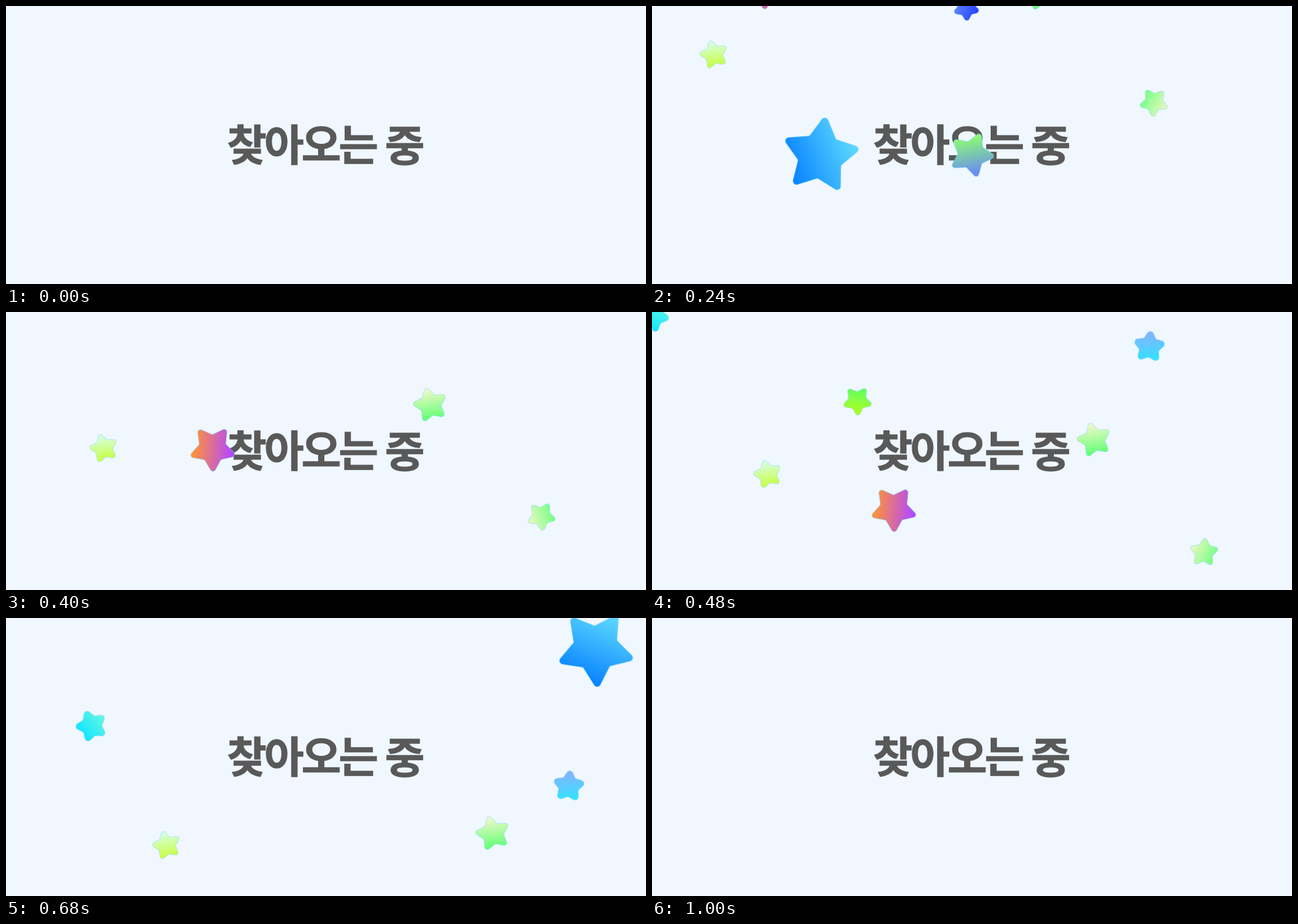
These frames come from a looping animation (1134x494 px, 1120 ms). An HTML page with a canvas:

```html
<!DOCTYPE html>
<html lang="ko">
<head>
<meta charset="utf-8">
<style>
html, body { margin: 0; width: 100%; height: 100%; overflow: hidden; background: #f0f7ff; }
canvas { display: block; }
</style>
</head>
<body>
<canvas id="stage" width="1134" height="494"></canvas>
<script>
const ctx = document.getElementById('stage').getContext('2d');
const STEP = 40, STEPS = 28, RAD = Math.PI / 180;
const stars = [];

// A star passes `pos` at its slowest moment, step `slow`, with velocity `vel`;
// surge and swerve speed it up (y, x) away from that moment, spin turns it per pixel fallen.
// The gradient angle runs clockwise from the star's tip.
function star(radius, colors, angle, turn, pos, vel, options) {
  const s = { turn, pos, vel, slow: 13, surge: 0.24, swerve: 0, spin: 0,
              round: 3 + radius * 0.05, ...options };
  const outer = radius + s.round * 1.04;
  const pts = Array.from({ length: 10 }, (_, i) => {
    const r = i % 2 ? outer * 0.54 : outer, a = i * 36 * RAD;
    return [r * Math.sin(a), -r * Math.cos(a)];
  });
  s.path = new Path2D();
  s.path.moveTo((pts[9][0] + pts[0][0]) / 2, (pts[9][1] + pts[0][1]) / 2);
  pts.forEach((p, i) => s.path.arcTo(...p, ...pts[(i + 1) % 10], i % 2 ? s.round * 0.6 : s.round));
  s.path.closePath();

  const gx = Math.sin(angle * RAD) * radius * 0.85, gy = -Math.cos(angle * RAD) * radius * 0.85;
  s.fill = ctx.createLinearGradient(-gx, -gy, gx, gy);
  colors.forEach((c, i) => s.fill.addColorStop(i, c));
  stars.push(s);
}

const blue = ['#0a84ff', '#58d4ff'], tumble = { surge: 0.3, swerve: 0.24, spin: 0.36 };
star(68, blue, -10, -14, [55, 7], [57, 60], { ...tumble, slow: 2 });
star(68, blue, -10, -8, [1009, -61], [5.1, 24], tumble);
star(25, ['#d6ffe0', '#c8ff40'], 185, -15, [221, 308.5], [15.9, 20]);
star(25, ['#e2f8bc', '#78ff86'], -103, 240, [993, 456.5], [14.8, 29], { spin: 0.7 });
star(30.5, ['#ecf8c8', '#62ff72'], 186, -14, [799.5, 255.5], [15.8, 28]);
star(40.5, ['#ff9238', '#b448ff'], 60, 35, [457.7, 400.5], [29.1, 50.5], { swerve: 0.16 });
star(27.5, ['#10e6ff', '#60f4e4'], 0, 31, [32.8, 42.8], [30.8, 35.5],
  { surge: 0.11, swerve: -0.07, spin: 0.14, round: 6 });
star(27.5, ['#84b4ff', '#32e2ff'], 170, 5, [904.3, 106.5], [23.2, 44.3], { round: 6 });
star(25.5, ['#62ff62', '#b0ff20'], 156, 34, [386, 249], [22, 91]);
star(39.5, ['#8cff70', '#6a8cf2'], 148, 22, [506, -11], [15, 65], { slow: 2 });
star(22.5, ['#5a84ff', '#2c44ff'], 77, 33, [417, -428], [35, 104], { slow: 2, round: 5 });

function drawStar(s, n) {
  const u = n - s.slow, fall = s.vel[1] * u + s.surge * u ** 3;
  ctx.save();
  ctx.translate(s.pos[0] + s.vel[0] * u + s.swerve * u ** 3, s.pos[1] + fall);
  ctx.rotate((s.turn + s.spin * fall) * RAD);
  ctx.fillStyle = s.fill;
  ctx.fill(s.path);
  ctx.stroke(s.path);
  ctx.restore();
}

function word(text, left, bottom) {
  const m = ctx.measureText(text);
  const at = [left + m.actualBoundingBoxLeft, bottom - m.actualBoundingBoxDescent];
  ctx.fillText(text, ...at);
  ctx.strokeText(text, ...at);
}

function draw(now) {
  const n = Math.floor(now / STEP) % STEPS;
  ctx.fillStyle = '#f0f7ff';
  ctx.fillRect(0, 0, 1134, 494);

  ctx.fillStyle = ctx.strokeStyle = '#595959';
  ctx.lineWidth = 1;
  ctx.lineJoin = 'miter';
  ctx.font = '700 76.5px "Noto Sans CJK KR", "Noto Sans CJK", sans-serif';
  ctx.letterSpacing = '-4.4px';
  word('찾아오는', 393.5, 282.5);
  word('중', 674.5, 282.5);

  ctx.strokeStyle = 'rgba(120, 215, 255, 0.4)';
  ctx.lineWidth = 1.5;
  stars.forEach(s => drawStar(s, n));
}

const start = performance.now();
function tick() {
  draw(performance.now() - start);
  requestAnimationFrame(tick);
}
tick();
</script>
</body>
</html>
```
